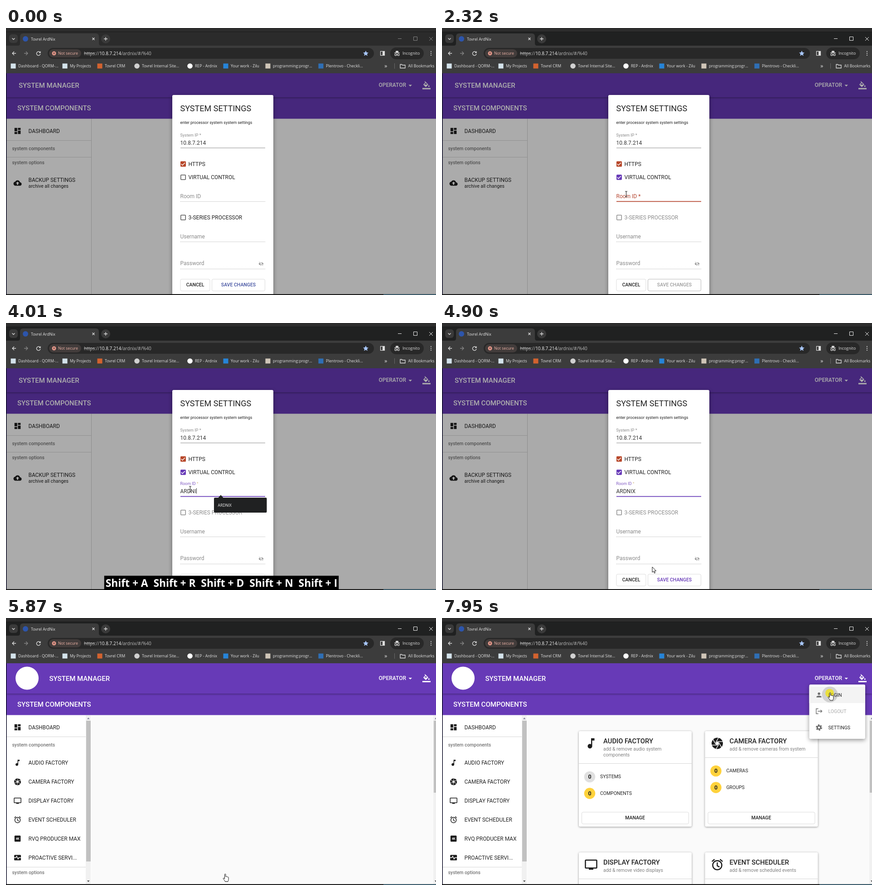
Recreate the animation shown at these times as an HTML page. Size 949 by 590 pixels, loop 8 s.

```html
<!DOCTYPE html>
<html lang="en">
<head>
<meta charset="utf-8">
<title>System manager</title>
<style>
  html, body { margin: 0; width: 100%; height: 100%; overflow: hidden; background: #111; }
  svg { display: block; width: 949px; height: 590px; font-family: Roboto, Arial, sans-serif; }
  .ui { font-family: "Open Sans", "Noto Sans", sans-serif; }
  .lift { filter: drop-shadow(0 1px 2px rgba(0,0,0,.4)); }
  .float { filter: drop-shadow(0 3px 5px rgba(0,0,0,.4)); }
  .ln { fill: none; stroke-width: 1.3; }
</style>
</head>
<body>
<svg id="stage" viewBox="0 0 949 590"></svg>
<script>
const LOOP = 8000, WORD = 'ARDNIX', PURPLE = '#673ab7', RED = '#b5452f';

// ---- markup helpers ----
const rect = (x, y, w, h, fill, more = '') => `<rect x="${x}" y="${y}" width="${w}" height="${h}" fill="${fill}" ${more}/>`;
const circle = (x, y, r, fill, more = '') => `<circle cx="${x}" cy="${y}" r="${r}" fill="${fill}" ${more}/>`;
const line = (d, color, more = '') => `<path class="ln" d="${d}" stroke="${color}" ${more}/>`;
const shape = (d, fill, more = '') => `<path d="${d}" fill="${fill}" ${more}/>`;
const group = (id, body, more = '') => `<g id="${id}" ${more}>${body}</g>`;
// cy is the middle of the capitals
const text = (x, cy, s, size, fill = '#222', weight = 400, more = '') =>
  `<text x="${x}" y="${cy + size * .355}" font-size="${size}" fill="${fill}" font-weight="${weight}" ${more}>${s}</text>`;
const ui = (x, cy, s, size = 8.7, fill = '#e3e3e3') => text(x, cy, s, size, fill, 400, 'class="ui"');
const mid = 'text-anchor="middle"';

// ---- icons on a 24 unit grid, c = colour, bg = colour behind ----
const icons = {
  dash: c => shape('M3 13h8V3H3zM3 21h8v-6H3zM13 21h8V11h-8zM13 3v6h8V3z', c),
  cloud: (c, bg) => shape('M19.35 10C18.7 6.6 15.6 4 12 4 9.1 4 6.6 5.6 5.35 8 2.3 8.4 0 10.9 0 14c0 3.3 2.7 6 6 6h13c2.8 0 5-2.2 5-5 0-2.6-2-4.8-4.65-5z', c)
    + shape('M14 13v4h-4v-4H7l5-5 5 5z', bg),
  note: c => shape('M12 3v10.5c-.6-.3-1.3-.5-2-.5-2.2 0-4 1.8-4 4s1.8 4 4 4 4-1.8 4-4V7h4V3z', c),
  shutter: (c, bg) => circle(12, 12, 10, c) + [0, 1, 2, 3, 4, 5].map(i =>
    `<path d="M9.4 10.5L14.4 1.6" stroke="${bg}" stroke-width="1.1" transform="rotate(${i * 60} 12 12)"/>`).join('')
    + shape('M14.6 10.5V13.5L12 15L9.4 13.5V10.5L12 9z', bg),
  screen: c => rect(2, 4, 20, 14, 'none', `rx="1" stroke="${c}" stroke-width="2"`) + rect(8, 18, 8, 3, c),
  alarm: c => circle(12, 13, 8, 'none', `stroke="${c}" stroke-width="2"`)
    + line('M12 8V14L16 16.3M2.6 6.5L7.2 2.6M21.4 6.5L16.8 2.6', c, 'style="stroke-width:1.9"'),
  four: (c, bg) => rect(3, 3, 18, 18, c, 'rx="2"') + text(12, 12, '4K', 8.5, bg, 700, mid),
  pulse: (c, bg) => rect(2, 4, 20, 16, c, 'rx="2"') + line('M2 12H7L9.5 8L13.5 16L16 12H22', bg, 'style="stroke-width:2"'),
  person: c => circle(12, 8, 4, c) + shape('M12 14c-2.7 0-8 1.3-8 4v2h16v-2c0-2.7-5.3-4-8-4z', c),
  leave: c => line('M10 4H3V20H10M8 12H21M17 7.5L21.5 12L17 16.5', c, 'style="stroke-width:2"'),
  gear: c => circle(12, 12, 5.2, 'none', `stroke="${c}" stroke-width="4"`)
    + circle(12, 12, 8.2, 'none', `stroke="${c}" stroke-width="3.4" stroke-dasharray="4.6 3.99"`),
  paint: (c, bg) => shape('M16.6 9L7.6 0 6.2 1.4l2.4 2.4L3.4 9c-.6.6-.6 1.5 0 2.1l5.5 5.5c.6.6 1.5.6 2.1 0l5.5-5.5c.6-.6.6-1.5.1-2.1z', c)
    + shape('M5.2 10L10 5.2 14.8 10z', bg) + shape('M19 11.5s-2 2.2-2 3.5c0 2.6 4 2.6 4 0 0-1.3-2-3.5-2-3.5zM0 20h24v4H0z', c),
  hidden: (c, bg) => shape('M1 12C5 2.7 19 2.7 23 12C19 21.300 5 21.300 1 12z', c) + circle(12, 12, 5, bg) + circle(12, 12, 3, c)
    + line('M3 2.500L21.500 21', bg, 'style="stroke-width:5"') + line('M3 3L21 21', c, 'style="stroke-width:1.800"'),
};
const icon = (name, cx, cy, size, c = '#1c1c1c', bg = '#fff') =>
  `<g transform="translate(${cx - size / 2} ${cy - size / 2}) scale(${size / 24})">${icons[name](c, bg)}</g>`;

// ---- browser window ----
function browser() {
  const marks = [
    [27, 'Dashboard - QORM-...', '#d3e2ea'], [141, 'My Projects', '#d3e2ea'], [218, 'Tovrel CRM', '#d2622f'],
    [300, 'Tovrel Internal Site...', '#d0d0d0', 1], [417, 'REP - Ardnix', '#fff', 1], [496, 'Your work - Zilu', '#2684d8'],
    [589, 'programming:progr...', '#cfc5b8'], [706, 'Plentrovo - Checkli...', '#2f6fb5']];
  const lite = '#dedede';
  return rect(0, 0, 949, 590, '#2d2d2d') + rect(0, 8, 949, 1, '#1a1a1a')
    + rect(0, 9, 949, 31, '#202121', 'id="title"')
    + rect(7, 14, 19, 19, '#3a3a3a', 'rx="6"') + line('M13.500 22.500L16.500 25.500L19.500 22.500', lite)
    + shape('M26 39Q31 39 31 34V19Q31 12 38 12H198Q205 12 205 19V34Q205 39 210 39z', '#3c3c3c')
    + circle(43, 24, 6, '#2d55ab') + ui(55, 24.500, 'Tovrel ArdNix')
    + line('M190.500 21.500L195.500 26.500M195.500 21.500L190.500 26.500', lite)
    + circle(220, 24, 10, '#3a3a3a') + line('M216 24H224M220 20V28', lite)
    + group('controls', '<path d="M865 23.500H873M899.500 19.500H907.500V27.500H899.500ZM934 20L942 28M942 20L934 28" fill="none"/>')
    + rect(0, 39, 949, 61, '#3c3c3c')
    + line('M22 56H14M18 52L14 56L18 60', lite) + line('M40 56H48M44 52L48 56L44 60', '#858585')
    + line('M75 53.500A4.300 4.300 0 1 0 76 57M76 51.500V54.500H73', lite)
    + rect(92, 44, 720, 24, '#282828', 'rx="12"') + rect(95, 47, 71, 18, '#423c3b', 'rx="9"')
    + circle(106, 56, 4.500, '#e8988a') + line('M104.500 54.500L107.500 57.500M107.500 54.500L104.500 57.500', '#423c3b')
    + ui(115, 56, 'Not secure', 8.700, '#efb4a8')
    + `<text class="ui" x="172" y="59.600" font-size="10" fill="#b9b9b9"><tspan text-decoration="line-through">https</tspan>://<tspan fill="#f4f4f4">10.8.7.214</tspan>/ardnix/#/%40</text>`
    + shape('M794 50l1.800 4 4.200.4-3.200 2.900 1 4.200-3.800-2.200-3.800 2.200 1-4.200-3.200-2.900 4.200-.4z', '#a8c7fa')
    + rect(826.500, 51.500, 9, 9, 'none', `stroke="${lite}" stroke-width="1.200"`) + rect(831, 51.500, 4.500, 9, lite)
    + rect(848, 43, 74, 26, '#282828', 'rx="13"')
    + line('M857 55H869', lite) + shape('M859.500 54l1-3.500h5l1 3.500z', lite)
    + [860, 866].map(x => circle(x, 59, 2, 'none', `stroke="${lite}" stroke-width="1.200"`)).join('') + line('M862 59H864', lite)
    + ui(875, 56, 'Incognito', 8.800) + [52, 56, 60].map(y => circle(938, y, 1.100, lite)).join('')
    + marks.map(([x, s, c, round]) => (round ? circle(x - 11, 84, 5.800, c) : rect(x - 16.500, 78.500, 11, 11, c)) + ui(x, 84, s)).join('')
    + ui(835, 83, '»', 13) + rect(857, 78, 1, 12, '#6a6a6a')
    + line('M870 80.500H873.500L875 82H881V88.500H870Z', lite) + ui(887.500, 84, 'All Bookmarks');
}

// ---- page ----
function bars(h, titleX) {
  const y = 100 + h, c = 100 + h / 2 - .3, r = h > 60 ? 133 : 126.500;
  return rect(1, y, 948, 47.500, PURPLE) + rect(1, 100, 948, h, PURPLE, 'class="lift"')
    + text(titleX, c, 'SYSTEM MANAGER', 15, '#fff', 500) + text(25, y + 23.800, 'SYSTEM COMPONENTS', 15, '#fff', 500)
    + text(822.500, r - .3, 'OPERATOR', 12, '#fff', 500) + shape(`M888.500 ${r - 1}h7.500l-3.750 3.700z`, '#fff')
    + icon('paint', 928, r, 18, '#fff', PURPLE);
}
const small = (y, s) => text(13.500, y, s, 10.400, '#757575', 500);
const entry = (y, s, name) => icon(name, 25.500, y, 18) + text(49.500, y, s, 11.900);
const rule = (x, y, w) => rect(x, y, w, 1, '#d6d6d6');

const firstPage = () => rect(1, 100, 948, 488, '#fafafa') + rect(1, 200, 187, 388, '#fcfcfc') + rect(188, 200, 1, 388, '#d0d0d0')
  + bars(53, 28) + entry(227.500, 'DASHBOARD', 'dash') + rule(1, 248, 187) + small(266, 'system components') + rule(1, 285, 187)
  + small(297, 'system options') + icon('cloud', 25.500, 342.500, 18) + text(49.500, 336, 'BACKUP SETTINGS', 11.900)
  + text(49.500, 349.500, 'archive all changes', 10.400);

function card(x, y, h, split, name, title, subs, counts) {
  return rect(x, y, 249, h, '#fff', 'rx="3" class="lift"') + rule(x, split, 249) + icon(name, x + 27, y + 27, 30)
    + text(x + 54, y + 21.500, title, 14.800, '#222', 500)
    + subs.map((s, i) => text(x + 54, y + 39.500 + 12.500 * i, s, 10.450, '#808080')).join('')
    + counts.map(([s, c], i) => {
      const cy = split + 30 + 36.600 * i;
      return circle(x + 24, cy, 12.300, c) + text(x + 24, cy, '0', 12.500, '#222', 700, mid) + text(x + 47, cy - .5, s, 10.450);
    }).join('')
    + (counts.length ? rect(x + 6.500, 429, 236, 26, '#fff', 'rx="3" stroke="#dcdcdc"') + text(x + 124, 441.500, 'MANAGE', 10.470, '#222', 500, mid) : '');
}
function secondPage() {
  const gold = '#ffd23c';
  const rows = [['AUDIO FACTORY', 'note'], ['CAMERA FACTORY', 'shutter'], ['DISPLAY FACTORY', 'screen'],
    ['EVENT SCHEDULER', 'alarm'], ['RVQ PRODUCER MAX', 'four'], ['PROACTIVE SERVI...', 'pulse']];
  const scroll = (x, w, h) => rect(x, 215, w, 373, '#f1f1f1') + rect(x + 1, 227, w - 1, h, '#c1c1c1')
    + shape(`M${x + 3} 223.500h5.500l-2.750-3.500z`, '#7d7d9a') + shape(`M${x + 3} 580h5.500l-2.750 3.500z`, '#505050');
  return rect(1, 100, 948, 488, '#fafafa') + rect(1, 214, 187, 374, '#fff') + bars(67, 95.500) + circle(46.500, 133, 25.500, '#fff')
    + entry(241.500, 'DASHBOARD', 'dash') + rule(1, 262, 175) + small(280.500, 'system components')
    + rows.map(([s, n], i) => entry(320 + i * 41.900, s, n)).join('') + rule(1, 550, 175) + small(562.500, 'system options')
    + scroll(176, 11, 311) + scroll(943, 11, 159)
    + group('cards',
      card(302, 250, 211, 321, 'note', 'AUDIO FACTORY', ['add &amp; remove audio system', 'components'], [['SYSTEMS', '#e0e0e0'], ['COMPONENTS', gold]])
      + card(580.500, 250, 211, 308, 'shutter', 'CAMERA FACTORY', ['add &amp; remove cameras from system'], [['CAMERAS', gold], ['GROUPS', gold]])
      + card(302, 518, 90, 576, 'screen', 'DISPLAY FACTORY', ['add &amp; remove video displays'], [])
      + card(580.500, 518, 90, 576, 'alarm', 'EVENT SCHEDULER', ['add &amp; remove scheduled events'], []));
}

// ---- dialog, menu, overlays ----
const tick = (x, y, more = '') => `<path d="M${x - 4} ${y}l2.800 2.800 5.400-5.600" fill="none" stroke="#fff" stroke-width="1.500" ${more}/>`;
const box = (y, id) => rect(385.800, y - 5.300, 10.400, 10.400, '#fff', `id="${id}" rx="1" stroke="#555" stroke-width="1.500"`);
const dots = y => line(`M385 ${y}H572`, '#aaa', 'style="stroke-width:1" stroke-dasharray="1.500 1.500"');
const dialog = () => rect(367, 148, 223, 450, '#fff', 'rx="3" class="float"')
  + text(384.500, 178, 'SYSTEM SETTINGS', 18) + text(384.500, 209.300, 'enter processor system system settings', 8.950)
  + text(384.500, 236.500, 'System IP *', 8.950, '#8a8a8a') + text(384.500, 253.300, '10.8.7.214', 12, '#333') + rect(385, 264.500, 187, 1, '#8c8c8c')
  + rect(385, 294.500, 12, 12, '#b7472a', 'rx="1.500"') + tick(390.700, 300.500) + text(402.500, 300.300, 'HTTPS', 11.950)
  + circle(391, 330, 14.500, PURPLE, 'id="halo"') + box(330, 'virtual') + tick(390.700, 330, 'id="tick"')
  + text(402.500, 329.500, 'VIRTUAL CONTROL', 11.950)
  + `<text id="label" x="384.500">Room ID<tspan id="star"> *</tspan></text>` + text(384.500, 371.300, '', 12, '#333', 400, 'id="value"')
  + rect(0, 365, 1, 12, '#333', 'id="caret"')
  + group('dotted', dots(383.500)) + rect(385, 383, 187, 1, '#8c8c8c', 'id="solid"') + rect(385, 382.500, 187, 1.700, RED, 'id="bar"')
  + box(418.800, 'series') + text(402.500, 418.500, '3-SERIES PROCESSOR', 11.950, '#222', 400, 'id="seriesText"')
  + text(384.500, 460.300, 'Username', 12, '#8a8a8a') + dots(472.500)
  + text(384.500, 520, 'Password', 12, '#8a8a8a') + dots(532.500) + icon('hidden', 563, 521, 11.500, '#8a8a8a')
  + rect(385, 555, 65, 26, '#fff', 'rx="3" stroke="#dcdcdc"') + text(417.500, 567.700, 'CANCEL', 10.470, '#222', 500, mid)
  + rect(454.500, 555, 117, 26, '#fff', 'id="saveBox" rx="3"') + text(513, 567.700, 'SAVE CHANGES', 10.470, '#222', 500, 'id="save" ' + mid)
  + group('popup', shape('M459 388q0-2 2-2h7.500l5.500-6 5.500 6h94q2 0 2 2v29q0 2-2 2h-112.500q-2 0-2-2z', '#202122') + ui(467.500, 403, WORD, 8.500, '#f4f4f4'));

const menu = () => rect(810.500, 147, 123.500, 120, '#fff', 'rx="3" class="float"')
  + rect(810.500, 152, 123.500, 36, '#f3f3f3', 'id="hover"') + circle(856, 169, 0, '#000', 'id="ripple" opacity=".14"')
  + icon('person', 832, 170, 16.500, '#6e6e6e') + text(852.500, 170, 'LOGIN', 10.470)
  + icon('leave', 832, 206, 16.500, '#6e6e6e') + text(852.500, 206, 'LOGOUT', 10.470, '#a8a8a8')
  + icon('gear', 832, 242, 17, '#6e6e6e') + text(852.500, 242, 'SETTINGS', 10.470);

const pen = 'stroke="#111" stroke-width="1" stroke-linejoin="round"';
const pointers = () => group('arrow', shape('M0 0V12L2.800 9.500L4.700 13.800L6.600 13L4.800 8.800H8.600z', '#fff', pen))
  + group('hand', shape('M3.500 1.200c0-1.600 2.400-1.600 2.400 0v5c.4-.9 2.100-.7 2.200.4 .5-.8 2-.5 2.100.5 .6-.6 1.900-.3 1.900.9v4c0 2.600-1.200 3-1.200 5H4.600c0-2-3.500-4.500-4.200-6.600-.5-1.400 1.200-1.900 2-.8l1.100 1.300z', '#fff', pen + ' transform="translate(-4.700 0)"'))
  + group('beam', line('M-2.500-6H-.7L0-5.500L.7-6H2.500M0-5.500V5.500M-2.500 6H-.7L0 5.500L.7 6H2.500', '#222', 'style="stroke-width:1.100"'));

const stage = document.getElementById('stage');
stage.innerHTML = '<clipPath id="view"><rect x="1" y="100" width="948" height="488"/></clipPath>' + browser()
  + group('page', group('first', firstPage()) + group('second', secondPage())
    + rect(1, 100, 948, 488, '#000', 'id="shade"') + group('dialog', dialog()) + group('menu', menu()), 'clip-path="url(#view)"')
  + rect(0, 100, 1.500, 488, '#14142c') + rect(0, 588, 949, 2, '#161616') + rect(833, 588.500, 116, 1.500, '#3d6a80')
  + group('keys', rect(425, 558.500, 100, 31.500, '#000', 'id="keyBox"') + '<text id="keyText" class="ui" x="475.500" y="583" font-size="22.800" font-weight="700" fill="#fff" text-anchor="middle"></text>')
  + circle(0, 0, 9.500, '#f5e600', 'id="click" opacity=".7"') + group('cursor', pointers());

// ---- time tables ----
const path = [[650, 640, 588], [1350, 392, 332], [1450, 392, 332], [1560, 399, 348], [1620, 399, 348], [1760, 406.500, 367],
  [4350, 406.500, 367], [4900, 464, 539], [5110, 483.700, 565.500], [6290, 483.700, 565.500], [6600, 831, 136], [7540, 831, 136], [7900, 856.500, 165]];
const looks = [[0, ''], [650, 'arrow'], [1690, 'beam'], [4420, 'arrow'], [5180, 'hand'], [6330, 'arrow'], [6580, 'hand']];
const typed = [[0, 0], [3060, 1], [3350, 2], [3560, 3], [3740, 4], [3940, 5], [4080, 6]];
const shown = [[0, 0, 0], [3060, 0, 1], [3350, 0, 2], [3560, 0, 3], [3740, 0, 4], [3940, 0, 5], [4080, 1, 6],
  [4150, 2, 6], [4350, 3, 6], [4490, 4, 6], [4630, 5, 6], [4770, 0, 0]];
const clicks = [[1420, 1490], [2250, 2320], [5450, 5520], [7050, 7120], [7900, 8000]];

const el = {};
stage.querySelectorAll('[id]').forEach(e => el[e.id] = e);
const set = (id, o) => { for (const k in o) el[id].setAttribute(k, o[k]); };
const show = (id, on) => el[id].style.display = on ? '' : 'none';
const ramp = (t, a, b) => Math.min(1, Math.max(0, (t - a) / (b - a)));
const ease = p => p * p * (3 - 2 * p);
const step = (table, t) => table.filter(r => r[0] <= t).pop();
const mix = (a, b, p) => `rgb(${a.map((v, i) => Math.round(v + (b[i] - v) * p))})`;
const within = (t, a, b) => t >= a && t < b;

function place(t) {
  let i = 0;
  while (i < path.length - 2 && t >= path[i + 1][0]) i++;
  const [a, x, y] = path[i], [b, u, v] = path[i + 1], p = ease(ramp(t, a, b));
  return [x + (u - x) * p, y + (v - y) * p];
}

function form(t) {
  const on = t >= 1430, n = step(typed, t)[1], check = ramp(t, 1490, 1630), up = ease(ramp(t, 2320, 2460)), size = 12 - 3.050 * up;
  set('halo', { opacity: .22 * ramp(t, 1420, 1490) * (1 - ramp(t, 1620, 1900)) });
  set('virtual', { fill: PURPLE, 'fill-opacity': check, stroke: on ? PURPLE : '#555' });
  set('tick', { opacity: ramp(t, 1570, 1680) });
  set('label', { y: 371.300 - 16.800 * up + size * .355, 'font-size': size,
    fill: n ? '#7e57c2' : mix([138, 138, 138], [181, 69, 47], ramp(t, 1470, 1640)) });
  set('star', { fill: n ? '#dcc79a' : 'inherit' });
  show('star', on); show('dotted', !on); show('solid', on);
  const half = 93.500 * ramp(t, 1490, 1574);
  set('bar', { x: 478.500 - half, width: 2 * half, fill: n ? PURPLE : RED });
  el.value.textContent = WORD.slice(0, n);
  show('caret', n && t < 4610);
  set('caret', { x: 385 + (n ? el.value.getComputedTextLength() : 0) });
  set('series', { stroke: on ? '#8c8c8c' : '#555' });
  set('seriesText', { fill: on ? '#8c8c8c' : '#222' });
  set('save', { fill: n ? PURPLE : on ? '#9c9c9c' : '#4150a0' });
  set('saveBox', { stroke: on && !n ? '#b8b8b8' : '#dcdcdc' });
  show('popup', within(t, 3060, 4420));
}

function keys(t) {
  const [, a, b] = step(shown, t);
  const s = within(t, 2990, 3060) ? 'Shift' : [...WORD.slice(a, b)].map(c => 'Shift + ' + c).join('\u00a0\u00a0');
  show('keys', s);
  if (!s) return;
  el.keyText.textContent = s;
  const w = el.keyText.getComputedTextLength() + 6;
  set('keyBox', { x: 475.500 - w / 2, width: w });
}

function draw(t) {
  const focus = t >= 650;
  set('title', { fill: focus ? '#202121' : '#2b2b2b' });
  set('controls', { stroke: focus ? '#f0f0f0' : '#858585' });
  show('first', t < 5870); show('second', t >= 5870);
  set('cards', { opacity: ramp(t, 5940, 6200) });
  set('shade', { opacity: .32 * (1 - ramp(t, 5520, 5775)) });
  show('dialog', t < 5600);
  set('dialog', { opacity: 1 - ramp(t, 5520, 5600) });
  if (t < 5600) form(t);
  keys(t);

  const open = ease(ramp(t, 7100, 7240)), k = .8 + .2 * open;
  show('menu', open);
  set('menu', { opacity: open, transform: `translate(872 147) scale(${k}) translate(-872 -147)` });
  show('hover', t >= 7600);
  set('ripple', { r: 17.500 * ramp(t, 7890, 7950) });

  const [x, y] = place(t), look = step(looks, t)[1];
  ['arrow', 'hand', 'beam'].forEach(id => show(id, id === look));
  set('cursor', { transform: `translate(${x} ${y})` });
  show('click', clicks.some(([a, b]) => within(t, a, b)));
  set('click', { cx: x - 1, cy: y + 1 });
}

const start = performance.now();
function frame() {
  draw((performance.now() - start) % LOOP);
  requestAnimationFrame(frame);
}
frame();
</script>
</body>
</html>
```
